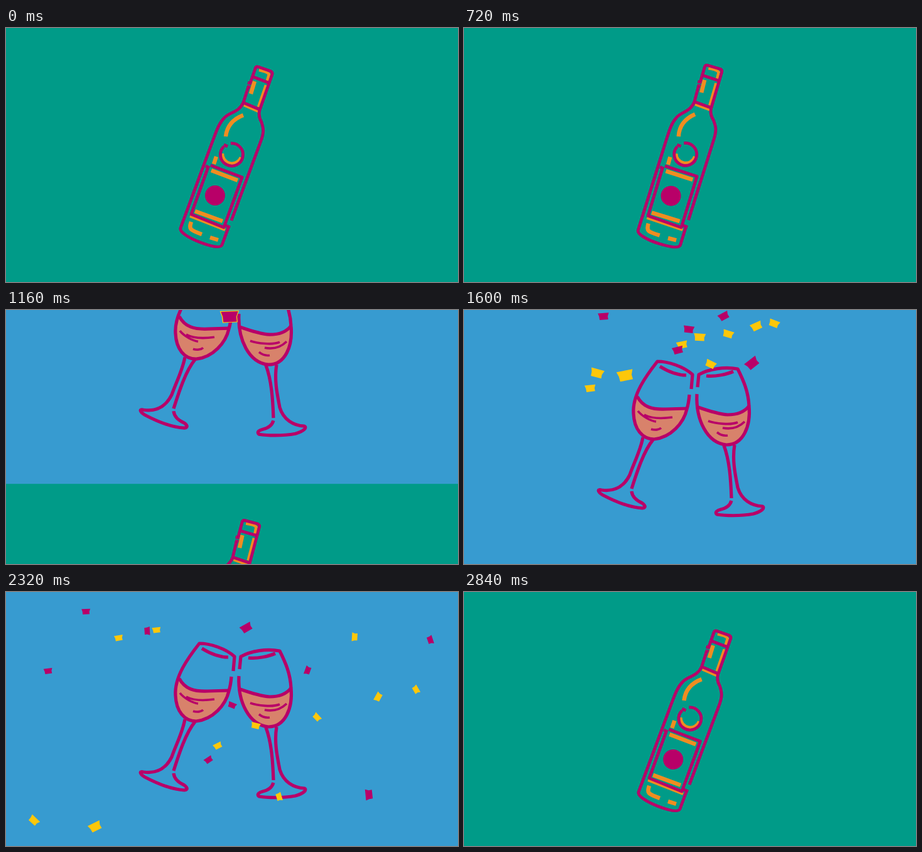
Animation of 720x405 px, one loop 2.88 s. Source, as an HTML page:

```html
<!DOCTYPE html>
<html lang="en">
<head>
<meta charset="utf-8">
<title>Wine and confetti</title>
<style>
  html, body { margin: 0; width: 100%; height: 100%; overflow: hidden; background: #009b88; }
  svg { display: block; width: 100%; height: 100%; }
  .line { fill: none; stroke: #b80068; stroke-linejoin: round; }
  .accent { fill: none; stroke: #f08d20; }
  .thick { stroke-width: 6.5; }
  .wine { fill: #d8826b; }
</style>
</head>
<body>
<svg viewBox="0 0 720 405" preserveAspectRatio="none">
  <g id="bottleScene">
    <rect width="720" height="405.5" fill="#009b88"/>
    <g id="bottle">
      <g class="accent" stroke-width="4.5">
        <path d="M403 67Q417 70 419 74L416 84M414 91L402 126M379 123L402 133"/>
        <path d="M345 200A15 15 0 0 0 374 206"/>
        <path d="M293 300L349 322"/>
        <g class="thick">
          <path d="M396 85L390 105M378 139C362 145 352 155 350 173M335 205L331 217"/>
          <path d="M327 227L369 243M301 292L345 308"/>
          <path d="M295 309C291 321 293 322 312 329M325 334L338 338"/>
        </g>
      </g>
      <g class="line" stroke-width="4.8">
        <path d="M386 94L378 119C371 135 356 134 348 143C339 152 335 165 330 178L278 319C276 325 291 335 310 342C326 348 341 352 344 346L355 316"/>
        <path d="M350 315L357 318M359 307L405 183C412 165 410 160 407 150C403 143 402 138 404 131L424 74Q425 71 422 69L402 62Q398 61 397 65L389 88M385 87L391 89M384 93L389 95"/>
        <path d="M394 78L420 88M378 119L404 130"/>
        <path d="M358 184A18 18 0 1 1 347 189M347 186L353 189"/>
        <path d="M326 219L376 238L347 318L295 297L322 222M318 220L324 223"/>
      </g>
      <circle cx="333" cy="267" r="16" fill="#b80068"/>
    </g>
  </g>

  <g id="glassScene">
    <rect width="720" height="405" fill="#379bd0"/>
    <path class="wine" d="M276 138C285 155 300 159 322 158L355 158C347 183 328 203 303 206C280 206 262 180 276 138Z"/>
    <path class="wine" d="M373 155C390 161 405 166 420 167C438 167 448 161 454 153C458 185 445 214 418 215C387 212 372 175 373 155Z"/>
    <g class="line" stroke-width="5.2">
      <path d="M362 126L364 103C350 90 325 82 308 82C290 105 268 135 270 165C271 190 284 206 303 206C330 203 350 180 355 158Q358 148 359 135"/>
      <path d="M276 138C285 155 300 159 322 158L355 157"/>
      <path d="M285 203C281 225 270 245 264 263C255 281 240 290 219 287C211 285 214 291 221 295C240 305 265 315 284 316C291 315 288 311 284 308C275 304 268 298 267 289"/>
      <path d="M301 207C286 225 275 260 267 285"/>
      <path d="M372 123L374 103C390 94 415 90 436 94C445 112 453 130 454 153C457 185 445 215 418 215C387 212 369 175 371 134"/>
      <path d="M373 155C390 161 405 166 420 167C438 167 448 161 454 153"/>
      <path d="M414 216C423 240 425 270 426 300"/>
      <path d="M431 215C427 240 432 262 436 283C442 303 458 312 475 313C480 315 475 321 461 325C440 329 415 328 403 326C398 322 405 319 409 318C418 316 424 311 426 304"/>
      <path d="M312 90C325 98 340 104 354 104M386 105C400 107 420 102 429 98"/>
      <g stroke-width="3.6">
        <path d="M277 161C284 170 298 177 306 178M287 167C300 174 318 173 332 171M298 190C304 192 311 191 314 188"/>
        <path d="M389 177C400 181 425 184 436 179M412 188C428 191 440 185 447 178M403 195C408 199 414 201 420 200"/>
      </g>
    </g>
    <g id="confetti"></g>
  </g>
</svg>
<script>
const LOOP = 2880, HALF = LOOP / 2, HEIGHT = 405;
const PUSH_START = 896, PUSH_TIME = 464;
const BURST = { x: 356, y: 139, time: 1160 };
const PIECES = 32, GRAVITY = 780, DRAG = 0.6;
const byId = id => document.getElementById(id);

let seed = 11;
function random() {
  seed = (seed * 16807) % 2147483647;
  return seed / 2147483647;
}

function makePiece(_, i) {
  const node = document.createElementNS('http://www.w3.org/2000/svg', 'path');
  node.setAttribute('d', 'M-7 -4L7 -4.5L5.5 0L6 4L-5 4.5L-5.5 0Z');
  node.setAttribute('fill', i < PIECES / 2 ? '#fdc70a' : '#b80068');
  byId('confetti').append(node);
  const side = 2 * ((i * 0.618) % 1) - 1;
  return {
    node,
    vx: 400 * side,
    vy: -200 - 430 * Math.sqrt(random()),
    spin: 180 * (random() - 0.5),
    size: 1 + 1.3 * random() ** 8
  };
}

const confetti = Array.from({ length: PIECES }, makePiece);

function movePiece({ node, vx, vy, spin, size }, age) {
  const x = BURST.x + vx * (1 - Math.exp(-DRAG * age)) / DRAG;
  const y = BURST.y + vy * age + GRAVITY * age * age / 2;
  const scale = size * (1.4 - 0.35 * age);
  node.setAttribute('transform', `translate(${x} ${y}) rotate(${spin * age}) scale(${scale})`);
}

const easeInOut = u => u < 0.5 ? 4 * u ** 3 : 1 - 4 * (1 - u) ** 3;
const clamp = u => Math.min(1, Math.max(0, u));

function place(id, y) {
  const node = byId(id);
  node.style.display = Math.abs(y) >= HEIGHT ? 'none' : '';
  node.setAttribute('transform', `translate(0 ${y})`);
}

function render(time) {
  const shift = HEIGHT * easeInOut(clamp((time % HALF - PUSH_START) / PUSH_TIME));
  const bottleLeaves = time < HALF;
  place('bottleScene', bottleLeaves ? shift : shift - HEIGHT);
  place('glassScene', bottleLeaves ? shift - HEIGHT : shift);

  // The sway runs on through the loop's seam, where its angle is zero.
  const sway = (bottleLeaves ? time : time - LOOP) / 1000;
  byId('bottle').setAttribute('transform', `rotate(${-4.4 * sway + 0.5 * sway * sway} 345 335)`);

  const age = (time - BURST.time) / 1000;
  byId('confetti').style.display = age < 0 ? 'none' : '';
  confetti.forEach(piece => movePiece(piece, age));
}

const start = performance.now();
function tick() {
  render((performance.now() - start) % LOOP);
  requestAnimationFrame(tick);
}
tick();
</script>
</body>
</html>
```
